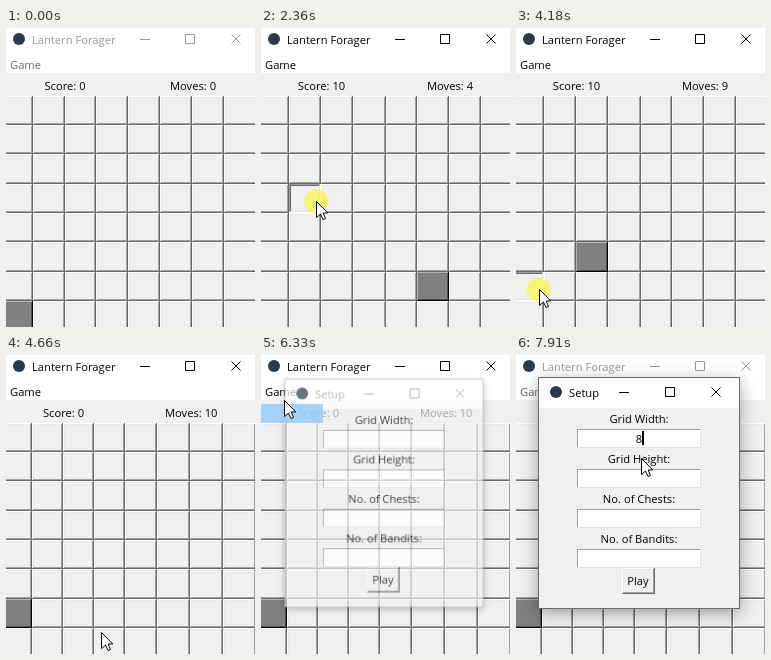
An HTML page with a canvas that plays this animation: 249x299 px, repeating every 7.99 s.

```html
<!DOCTYPE html>
<html lang="en">
<head>
<meta charset="utf-8">
<title>Lantern Forager</title>
<style>
html, body { margin: 0; width: 100%; height: 100%; overflow: hidden; background: #fff; }
canvas { display: block; width: 249px; height: 299px; }
</style>
</head>
<body>
<canvas id="stage" width="249" height="299"></canvas>
<script>
const W = 249, H = 299, LOOP = 7990, PRESS = 160;
const ACTIVATE = 700, MENU = 5540, SETUP = 6170, FOCUS = 6640, ENTRY = 7510, TYPED = 7750;
const stage = document.getElementById('stage').getContext('2d');
const layer = document.createElement('canvas');
layer.width = W;
layer.height = H;
const popup = layer.getContext('2d');
let g = stage;

const within = (t, a, b) => t >= a && t < b;
const clamp = v => Math.max(0, Math.min(1, v));
const smooth = v => v * v * (3 - 2 * v);

// The two label texts set where the grid's halves meet and end.
const GRID_LEFT = -4;
const START = { mid: 122, end: 251 }, PLAYING = { mid: 125, end: 252 }, ROBBED = { mid: 119, end: 250.5 };
const rowTop = r => Math.round(67.5 + 29.35 * r);
const colLeft = ({ mid, end }, c) =>
  Math.floor(mid + (c - 4) * (c < 4 ? mid - GRID_LEFT : end - mid) / 4);

// Squares the piece visits: time, column, row.
const MOVES = [
  [0, 0, 7], [860, 3, 3], [1100, 4, 1], [1730, 6, 6], [2200, 5, 6], [2440, 1, 3],
  [3060, 2, 1], [3380, 3, 0], [3620, 3, 2], [3940, 2, 5], [4260, 0, 6]
];

// The pointer rests at each stop for the press time before it is left.
const stop = (t, x, y, click = false) => ({ t, x, y, click });
const STOPS = [
  stop(140, 150, 300),
  ...MOVES.slice(1).map(([t, c, r], i) => {
    const side = MOVES[i][1] < c ? -11 : 11;
    return stop(t, 32 * c + 12 + side, rowTop(r) + 17, true);
  }),
  stop(4660, 95, 277),
  stop(5300, 20, 8),
  stop(MENU, 18, 36, true),
  stop(6090, 24, 54, true),
  stop(6330, 23, 45),
  stop(7590, 99, 84, true),
  stop(7910, 125, 103)
];

function box(color, x, y, w, h) {
  g.fillStyle = color;
  g.fillRect(x, y, w, h);
}

function label(str, x, y, color = '#000', align = 'left') {
  g.font = '11.2px "Open Sans", "Noto Sans", sans-serif';
  g.textAlign = align;
  g.fillStyle = color;
  g.fillText(str, x, y);
}

function disc(color, x, y, r) {
  g.fillStyle = color;
  g.beginPath();
  g.arc(x, y, r, 0, 7);
  g.fill();
}

function bevel(x, y, w, h, fill, [tl, tlIn, br, brIn]) {
  box(br, x, y, w, h);
  box(tl, x, y, w - 1, h - 1);
  box(brIn, x + 1, y + 1, w - 2, h - 2);
  box(tlIn, x + 1, y + 1, w - 3, h - 3);
  box(fill, x + 2, y + 2, w - 4, h - 4);
}
const RAISED = ['#fff', '#e9e9e9', '#696969', '#a0a0a0'];
const SUNKEN = ['#a0a0a0', '#696969', '#fff', '#e3e3e3'];
const FIELD = ['#a0a0a0', '#fff', '#e3e3e3', '#fff'];
const PIECE = ['#b4b4b4', '#808080', '#000', '#505050'];

function titleBar(str, x, y, buttons, gap, color) {
  disc('#2b3a4a', x, y, 6);
  label(str, x + 13, y + 5, color);
  const max = buttons + Math.floor(gap) + 0.5, close = buttons + gap * 2 + 0.5, top = y - 4.5;
  g.strokeStyle = color;
  g.lineWidth = 1;
  g.beginPath();
  g.moveTo(buttons, y + 0.5);
  g.lineTo(buttons + 10, y + 0.5);
  g.rect(max, top, 9, 9);
  g.moveTo(close, top);
  g.lineTo(close + 9, top + 9);
  g.moveTo(close + 9, top);
  g.lineTo(close, top + 9);
  g.stroke();
}

function drawGame(t) {
  const active = within(t, ACTIVATE, FOCUS);
  const open = within(t, MENU, SETUP);
  box('#fff', 0, 0, W, 45);
  box('#f0f0f0', 0, 45, W, H - 45);
  titleBar('Lantern Forager', 13, 11, 134, 45.5, active ? '#000' : '#999');
  if (open) box('#cce8ff', 0, 27, 41, 19);
  label('Game', 4, 41, active ? '#000' : '#6d6d6d');

  const n = MOVES.findLastIndex(m => m[0] <= t);
  const last = MOVES.length - 1;
  const grid = n === 0 ? START : n < last ? PLAYING : ROBBED;
  label('Score: ' + (grid === PLAYING ? 10 : 0), (GRID_LEFT + grid.mid) / 2, 62, '#000', 'center');
  label('Moves: ' + n, (grid.mid + grid.end) / 2 + 0.5, 62, '#000', 'center');

  const next = MOVES[n + 1];
  const isAt = (m, c, r) => m[1] === c && m[2] === r;
  for (let r = 0; r < 8; r++) {
    for (let c = 0; c < 8; c++) {
      const x = colLeft(grid, c), y = rowTop(r);
      const w = colLeft(grid, c + 1) - x, h = rowTop(r + 1) - y;
      const here = isAt(MOVES[n], c, r);
      const pressed = next && t >= next[0] - PRESS && isAt(next, c, r);
      bevel(x, y, w, h, here ? '#808080' : '#f0f0f0', here ? PIECE : pressed ? SUNKEN : RAISED);
    }
  }
  if (open) drawMenu(t);
}

function drawMenu(t) {
  box('rgba(0,0,0,.18)', 0, 50, 68, 44);
  box('#ccc', 0, 46, 65, 45);
  box('#f2f2f2', 0, 47, 64, 43);
  if (t >= MENU + PRESS) box('#91c9f7', 0, 49, 62, 19);
  label('Setup', 7, 63);
  label('Quit', 7, 83);
}

function drawSetup(t) {
  const focused = t >= FOCUS;
  const p = clamp((t - SETUP) / 320);
  const ready = p > 0.7;
  g = popup;
  g.clearRect(0, 0, W, H);
  g.save();
  g.shadowColor = 'rgba(0,0,0,.35)';
  g.shadowBlur = focused ? 16 : 7;
  g.shadowOffsetY = focused ? 4 : 2;
  box(ready ? '#6a6a6a' : '#bbb', 22, 22, 202, 232);
  g.restore();
  box('#fff', 23, 23, 200, 30);
  box('#f0f0f0', 23, 53, 200, 200);
  titleBar('Setup', 40, 37, 103, 46, ready ? '#000' : '#999');
  ['Grid Width:', 'Grid Height:', 'No. of Chests:', 'No. of Bandits:'].forEach((name, i) => {
    const y = 68 + 40 * i;
    label(name, 123, y, '#000', 'center');
    bevel(61, y + 6, 124, 19, '#fff', FIELD);
  });
  bevel(106, 213, 33, 26, '#f0f0f0', RAISED);
  label('Play', 122, 230, '#000', 'center');
  if (t >= TYPED) label('8', 123, 88, '#000', 'center');
  if (t >= ENTRY) box('#000', t >= TYPED ? 126 : 123, 76, 2, 14);
  g = stage;

  // Fades in quickly while growing to full size.
  const alpha = Math.sqrt(p), scale = 0.95 + 0.05 * alpha;
  g.save();
  g.globalAlpha = alpha;
  g.translate(123, 138);
  g.scale(scale, scale);
  g.drawImage(layer, -123, -138);
  g.globalAlpha = 1;
  g.restore();

  // The chosen menu item lingers above the new window.
  g.globalAlpha = 0.8 * clamp(2 * (1 - p));
  box('#91c9f7', 0, 49, 62, 19);
  g.globalAlpha = 1;
}

function drawPointer(t) {
  const i = STOPS.findIndex(s => s.t > t);
  const b = STOPS.at(i), a = STOPS[i - 1] || b;
  const leave = a.t + (b.t - a.t) / 4, arrive = b.t - PRESS;
  const k = smooth(clamp((t - leave) / Math.max(1, arrive - leave)));
  const x = Math.round(a.x + (b.x - a.x) * k);
  const y = Math.round(a.y + (b.y - a.y) * k);
  if (b.click && within(t, arrive, b.t)) disc('rgba(248,246,50,.65)', x, y + 0.5, 12);
  g.save();
  g.translate(x + 0.5, y + 0.5);
  g.beginPath();
  [[0, 0], [0, 16], [4, 12.5], [6.5, 18], [9, 17], [6.7, 11.5], [11.3, 11.5]]
    .forEach(([px, py]) => g.lineTo(px, py));
  g.closePath();
  g.fillStyle = '#fff';
  g.fill();
  g.strokeStyle = '#000';
  g.lineWidth = 1;
  g.stroke();
  g.restore();
}

const start = performance.now();
function loop() {
  const t = (performance.now() - start) % LOOP;
  drawGame(t);
  if (t > SETUP) drawSetup(t);
  drawPointer(t);
  requestAnimationFrame(loop);
}
loop();
</script>
</body>
</html>
```
